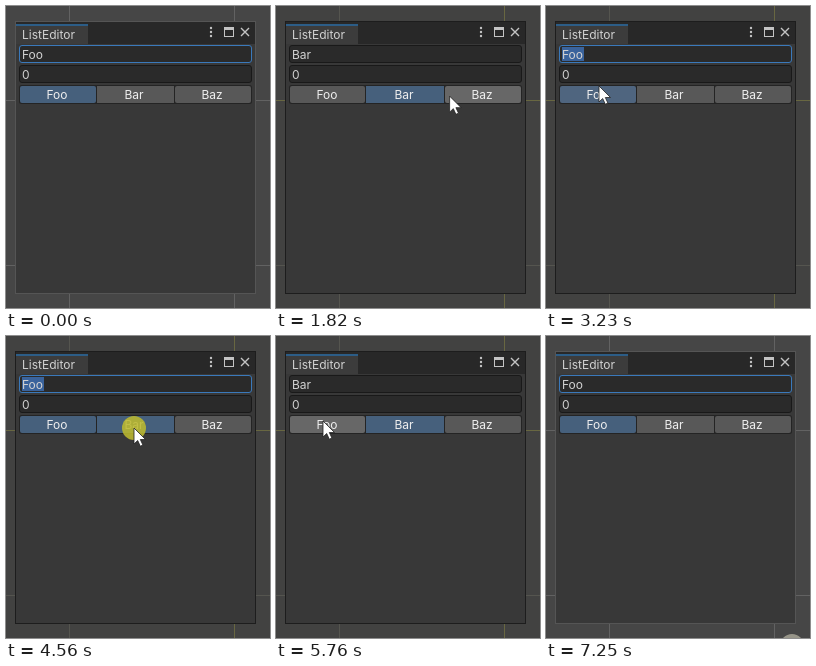
Animation, 264 px wide and 302 px high, one loop 7.45 s. Source, as an HTML page:

```html
<!DOCTYPE html>
<html lang="en">
<head>
<meta charset="utf-8">
<title>ListEditor</title>
<style>
html, body { margin: 0; width: 100%; height: 100%; overflow: hidden; background: #464646; }
svg { display: block; width: 264px; height: 302px; }
text { font: 12px Inter, Roboto, sans-serif; fill: #d2d2d2; }
.crisp { shape-rendering: crispEdges; }
#back { fill: #464646; }
#grid { stroke: #626262; }
#frame { fill: #555; }
.live #back { fill: #424241; }
.live #grid { stroke: #55554f; }
.live #grid .warm { stroke: #686741; }
.live #frame { fill: #1d1d1d; }
.field { fill: #2a2a2a; stroke: #191919; }
.focus { stroke: #3a79bb; }
#buttons rect { fill: #585858; }
#buttons .hover { fill: #676767; }
#buttons .on { fill: #46607c; }
#buttons .on.hover { fill: #4f657f; }
#buttons text { fill: #eee; text-anchor: middle; }
#beam { fill: none; stroke: #fff; mix-blend-mode: difference; }
</style>
</head>
<body>
<svg id="stage" viewBox="0 0 264 302">
  <rect id="back" width="264" height="302"/>
  <g id="grid" class="crisp">
    <path d="M63.5 0V302M0 259.5H264"/>
    <path class="warm" d="M228.5 0V302M0 94.5H264"/>
  </g>
  <g class="crisp">
    <rect id="frame" x="9" y="15" width="241" height="273"/>
    <rect x="10" y="16" width="239" height="271" fill="#383838"/>
    <rect x="10" y="16" width="239" height="22" fill="#282828"/>
    <rect x="10" y="18" width="72" height="20" fill="#3c3c3c"/>
    <rect x="10" y="18" width="72" height="2" fill="#2c5d87"/>
  </g>
  <text x="16" y="33">ListEditor</text>
  <g fill="#c4c4c4">
    <circle cx="205" cy="22" r="1.2"/>
    <circle cx="205" cy="26" r="1.2"/>
    <circle cx="205" cy="30" r="1.2"/>
    <path class="crisp" d="M218 21h10v10h-10zM219 24v6h8v-6z" fill-rule="evenodd"/>
    <path d="M235 22l8 8M243 22l-8 8" stroke="#c4c4c4" stroke-width="1.4"/>
  </g>
  <rect id="name" class="field" x="13.5" y="39.5" width="232" height="17" rx="2.5"/>
  <rect id="mark" class="crisp" x="16" y="41" width="22" height="14" fill="#3a639c"/>
  <text id="value" x="16" y="53">Foo</text>
  <rect class="field" x="13.5" y="59.5" width="232" height="17" rx="2.5"/>
  <text x="16" y="73">0</text>
  <rect x="13" y="79" width="233" height="19" rx="2.5" fill="#242424"/>
  <g id="buttons"></g>
  <circle id="halo" r="12" fill="#bcb82f" opacity=".88"/>
  <path id="beam" d="M-2 -7.5H2M.5 -7.5V8M-2 8H2"/>
  <path id="arrow" d="M0 0V16L3.7 12.5 6.3 18.2 8.9 17 6.3 11.5H11.5Z" fill="#fff" stroke="#222" stroke-width=".8"/>
</svg>
<script>
const LOOP = 7450, STEP = 65;
const names = ['Foo', 'Bar', 'Baz'];
const start = [256, 345];
// start time, end time, x, y
const moves = [
  [5, 615, 22, 47],
  [1215, 1350, 132, 89],
  [1755, 2020, 205, 91],
  [2220, 2490, 137.5, 89],
  [2745, 2950, 53, 80],
  [4155, 4490, 128, 92],
  [4620, 4890, 205, 93],
  [5030, 5230, 128, 92],
  [5490, 5760, 47, 85],
  [5970, 6510, 246, 310]
];
// press time, release time, button
const clicks = [
  [1620, 1680, 1], [2160, 2220, 2], [2670, 2740, 1], [3090, 3230, 0],
  [4560, 4620, 1], [4960, 5030, 2], [5420, 5490, 1], [5900, 5970, 0]
];
const $ = id => document.getElementById(id);
const within = (v, lo, hi) => v >= lo && v < hi;
const show = (el, on) => el.setAttribute('visibility', on ? 'visible' : 'hidden');
const place = (el, x, y) => el.setAttribute('transform', `translate(${x} ${y})`);

function add(tag, attrs) {
  const el = document.createElementNS('http://www.w3.org/2000/svg', tag);
  for (const k in attrs) el.setAttribute(k, attrs[k]);
  return $('buttons').appendChild(el);
}
const buttons = names.map((label, i) => {
  const box = add('rect', { y: 80, height: 17, rx: i === 1 ? 0 : 2 });
  add('text', { x: [51, 128, 206][i], y: 93 }).textContent = label;
  return box;
});

function pointer(t) {
  let [x, y] = start;
  for (const [from, to, tx, ty] of moves) {
    if (t < from) break;
    const p = t >= to ? 1 : Math.floor((t - from) / STEP) * STEP / (to - from);
    const e = 1 - (1 - p) ** 3;
    x += (tx - x) * e;
    y += (ty - y) * e;
  }
  return [x, y];
}

function draw(t) {
  const [x, y] = pointer(t);
  const live = within(t, 940, 7170);
  const outside = t >= 7170;
  let picked = 0, pressed = -1;
  for (const [down, up, i] of clicks) {
    if (t >= up) picked = i;
    else if (t >= down) pressed = i;
  }

  $('stage').setAttribute('class', live ? 'live' : '');
  $('name').classList.toggle('focus', picked === 0);
  $('value').textContent = names[picked];
  show($('mark'), picked === 0 && within(t, 1080, 7170));

  const edges = [13, picked > 0 ? 89 : 90, picked > 1 ? 167 : 168, 246];
  buttons.forEach((box, i) => {
    const left = edges[i] + 1, right = edges[i + 1];
    box.setAttribute('x', left);
    box.setAttribute('width', right - left - (i === 2 ? 1 : 0));
    box.classList.toggle('on', i === picked || i === pressed);
    box.classList.toggle('hover', i !== pressed && within(x, left, right) && within(y, 79, 98));
  });

  const typing = within(x, 13, 246) && (within(y, 39, 57) || within(y, 59, 77));
  show($('beam'), typing);
  show($('arrow'), !typing);
  show($('halo'), pressed >= 0 || within(t, 680, 1080) || outside);
  $('halo').setAttribute('fill', outside ? '#a3a193' : '#bcb82f');
  for (const id of ['beam', 'arrow', 'halo']) place($(id), x, y);
}

const begin = performance.now();
function tick() {
  draw((performance.now() - begin) % LOOP);
  requestAnimationFrame(tick);
}
tick();
</script>
</body>
</html>
```
